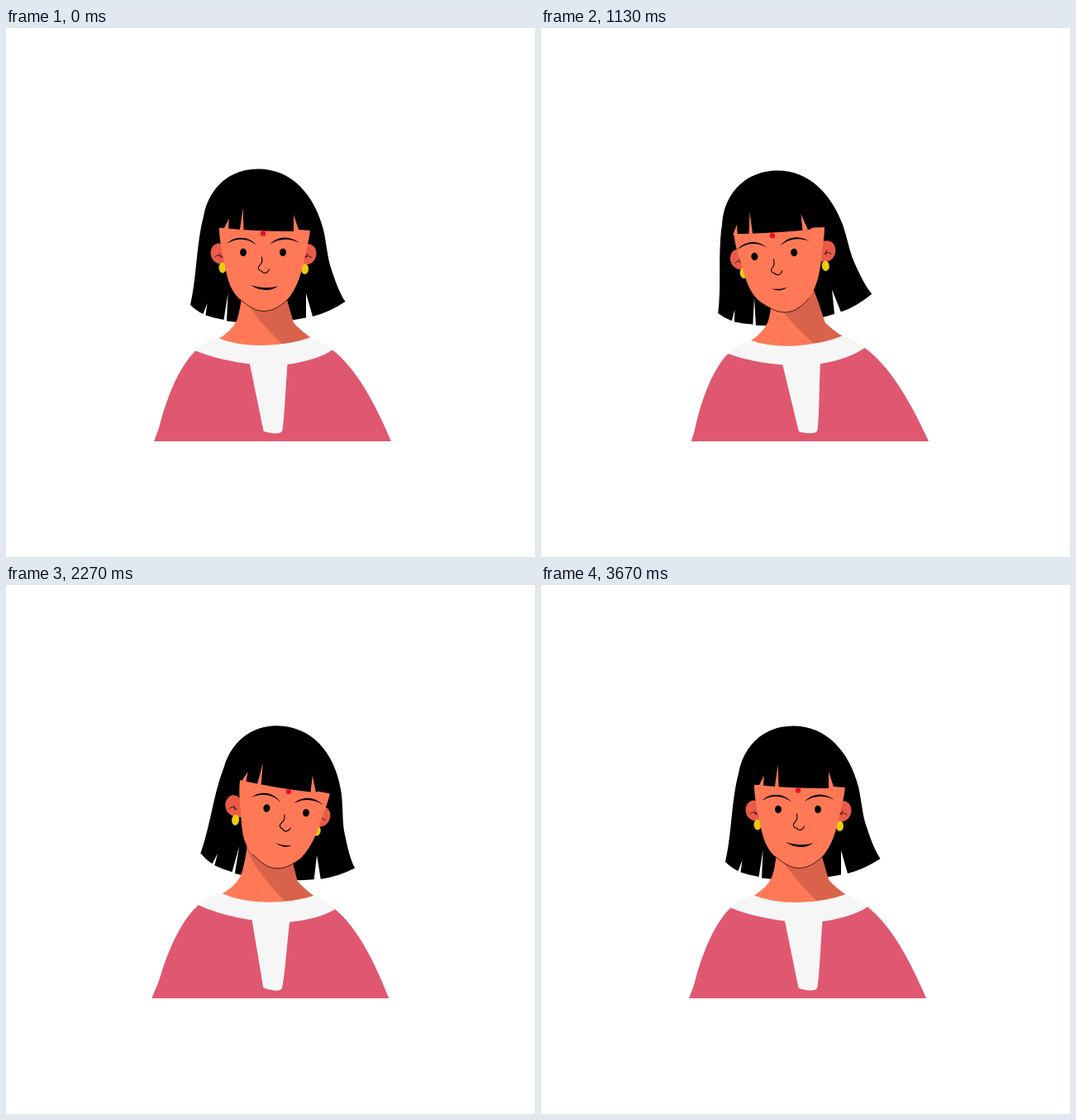
Recreate the animation shown at these times as an HTML page. Size 640 by 640 pixels, loop 4810 ms.

```html
<!DOCTYPE html>
<html lang="en">
<head>
<meta charset="utf-8">
<title>Portrait looking around</title>
<style>
html, body { margin: 0; width: 100%; height: 100%; overflow: hidden; background: #fff; }
svg { display: block; width: 100vw; height: 100vh; }

.body, .head, .shift, .brows, .eye, .mouth {
  animation-duration: 4810ms;
  animation-timing-function: ease-in-out;
  animation-iteration-count: infinite;
}
.skin { fill: #ff7957; }
.ear { fill: #e95b49; }
.gold { fill: #efc90c; }
.line { fill: none; stroke: #000; stroke-width: 1.1; stroke-linecap: round; }
.thin { stroke-width: .7; }

.body { transform-origin: 322px 480px; animation-name: sway; }
.head { transform-origin: 316.5px 333px; animation-name: slide, tilt; }
.shift { animation-name: shift; }
.brows { animation-name: frown; }
.eye { transform-box: fill-box; transform-origin: center; animation-name: blink; }
.mouth { transform-origin: 312.5px 313px; animation-name: smile; }

/* sideways travel: left pose, arriving right, resting right, rebound */
.ears { --a: -3.2px; --b: -2.5px; --c: -1.8px; --d: .8px; }
.face { --a: -6.2px; --b: 3.3px; --c: 2px; --d: -.3px; }
.features { --a: -13px; --b: 10px; --c: 9px; --d: -1.5px; }
.gaps { --a: -13px; --b: -1px; --c: -1.5px; --d: 2px; }

@keyframes sway {
  0%, .62% { rotate: 0deg; }
  11.23% { rotate: -2.5deg; }
  21.83%, 29.11% { rotate: -2.1deg; }
  39.09%, 51.98% { rotate: 2.05deg; }
  66.53% { rotate: -1.2deg; }
  76.3%, 100% { rotate: 0deg; }
}
@keyframes slide {
  0%, .62% { translate: 0px; }
  13.1%, 29.11% { translate: -9.5px .3px; }
  40.54%, 51.56% { translate: 12px .5px; }
  66.53% { translate: -2.5px; }
  76.3%, 100% { translate: 0px; }
}
@keyframes tilt {
  0%, .62% { rotate: 0deg; }
  17.88%, 29.52% { rotate: -5.9deg; }
  44.07%, 51.56% { rotate: 6.7deg; }
  67.98% { rotate: -1.3deg; }
  76.3%, 100% { rotate: 0deg; }
}
@keyframes shift {
  0%, .62% { translate: 0px; }
  12.06%, 29.11% { translate: var(--a); }
  39.09% { translate: var(--b); }
  47.19%, 51.56% { translate: var(--c); }
  66.53% { translate: var(--d); }
  76.3%, 100% { translate: 0px; }
}
@keyframes frown {
  0%, 4.78% { translate: 0px; }
  8.5% { translate: 0px 7px; }
  13.5%, 55% { translate: 0px; }
  58.84% { translate: 0px 6.5px; }
  63.5%, 100% { translate: 0px; }
}
@keyframes blink {
  0%, 4.78% { scale: 1 1; }
  7.69% { scale: 1 .14; }
  11.02%, 55.93% { scale: 1 1; }
  58.84% { scale: 1 .14; }
  62.16%, 100% { scale: 1 1; }
}
@keyframes smile {
  0%, .62% { scale: 1; }
  12.06%, 51.56% { scale: .58; }
  58.84%, 100% { scale: 1; }
}
</style>
</head>
<body>
<svg viewBox="0 0 640 640">
  <defs>
    <clipPath id="floor"><rect width="640" height="500"/></clipPath>
  </defs>

  <g class="head">
    <path d="M223 335 C231 300 230 262 239 228 C245 194 270 170.5 305 170.5
      C346 170.5 373 202 384 244 C388 262 389 278 393 290 C398 305 403 320 410.500 331
      Q391 344 371 349 L363 321 V350.5 L346 353.5 L280 356 L267 354.5
      L268.5 321 L263.5 353 Q252 351 241.5 347.5 L243.5 333 L238.5 346 Q230 342 223 335Z"/>
  </g>

  <g clip-path="url(#floor)">
    <g class="body">
      <path class="skin" d="M287 300 L286 318 C284 334 282 347 279 354 Q273 367 255 377.500 L312 392 L372 377
        Q356 366 348 357 Q345 347 341 333 L336 318 L330 300Z"/>
      <path fill="#d9624b" d="M285 318 Q292 342 335 383.500 L372 377 Q356 366 348 357 Q345 347 341 333 L336 318Z"/>
      <path fill="#df586f" d="M172 520 L179 500 Q185 486 188 473 C198 438 212 407 229.500 390.500
        L312 395 L395 389.500 C424 412 447 455 466 500 L474 520Z"/>
      <path fill="#f6f6f6" d="M229.500 390.500 Q243 377 258 375.500 Q280 384.500 312 384 Q345 383 369 374
        Q384 380 395 389.500 Q376 402 340.500 407 C338 440 337 470 334.500 486
        Q334 490.500 326 490.500 Q317 490 311.500 487.500 L295 406.500 Q254 401 229.500 390.500Z"/>
    </g>
  </g>

  <g class="head">
    <g class="shift ears">
      <path class="ear" d="M272 263 H264 C255 257 248 263 247.500 272 C248 282 256 287 266 286 H272Z"/>
      <path class="ear" d="M351 263 H359 C369 258 376 265 375.500 274 C374 283 368 288 358 286 H351Z"/>
      <path class="line thin" d="M253 277 Q256 273 262 277 M258 273 Q260 275 260 278
        M370 278 Q367 274 361 277 M365 273 Q363 275 363 278"/>
      <ellipse class="gold" cx="262" cy="290" rx="4.500" ry="6.500"/>
      <ellipse class="gold" cx="361.500" cy="291.500" rx="4.500" ry="6.300"/>
    </g>
    <g class="shift face">
      <path class="skin" d="M258 241 C258 254 260 264 263.500 280 C267 300 270 317 284 329
        C296 339 304 342.500 312 342.500 C322 342.500 330 338 340 329
        C350 318 356 302 360 284 C363 268 367 257 368 244Z"/>
      <path class="line thin" d="M284 329 C296 339 304 342.500 312 342.500 C322 342.500 330 338 340 329"/>
      <path d="M257.500 241.500 Q300 246 349 246 L354 244 L368.500 245 L362 205 H264Z"/>
    </g>
    <g class="shift gaps">
      <path class="skin" d="M269.800 230.500 L263.500 243 L269 244.500Z M286.700 217.500 L282.700 245.500 H287.500Z
        M348 226 V247 L354.500 245.500Z"/>
    </g>
    <g class="shift features">
      <circle cx="311" cy="248.500" r="3.200" fill="#e4122e"/>
      <g class="brows">
        <path d="M267 261 C277 251 293 251 303 262.500 C293 254.500 280 253 267 261Z"/>
        <path d="M319 262 C329 251 343 251 355 260 C342 253.500 330 254.500 319 262Z"/>
      </g>
      <ellipse class="eye" cx="287" cy="271.500" rx="4" ry="4.700"/>
      <ellipse class="eye" cx="335" cy="271.500" rx="4" ry="4.700"/>
      <path class="line" d="M309.500 277 C311 284 308 286 305.800 288.500 C304.500 291 306 293.500 309 294
        C311 297.500 316 297.500 318.500 292"/>
      <path class="mouth" d="M296 311 C305 314.500 320 315.500 329 312 C322 319 306 318.500 296 311Z"/>
    </g>
  </g>
</svg>
</body>
</html>
```
